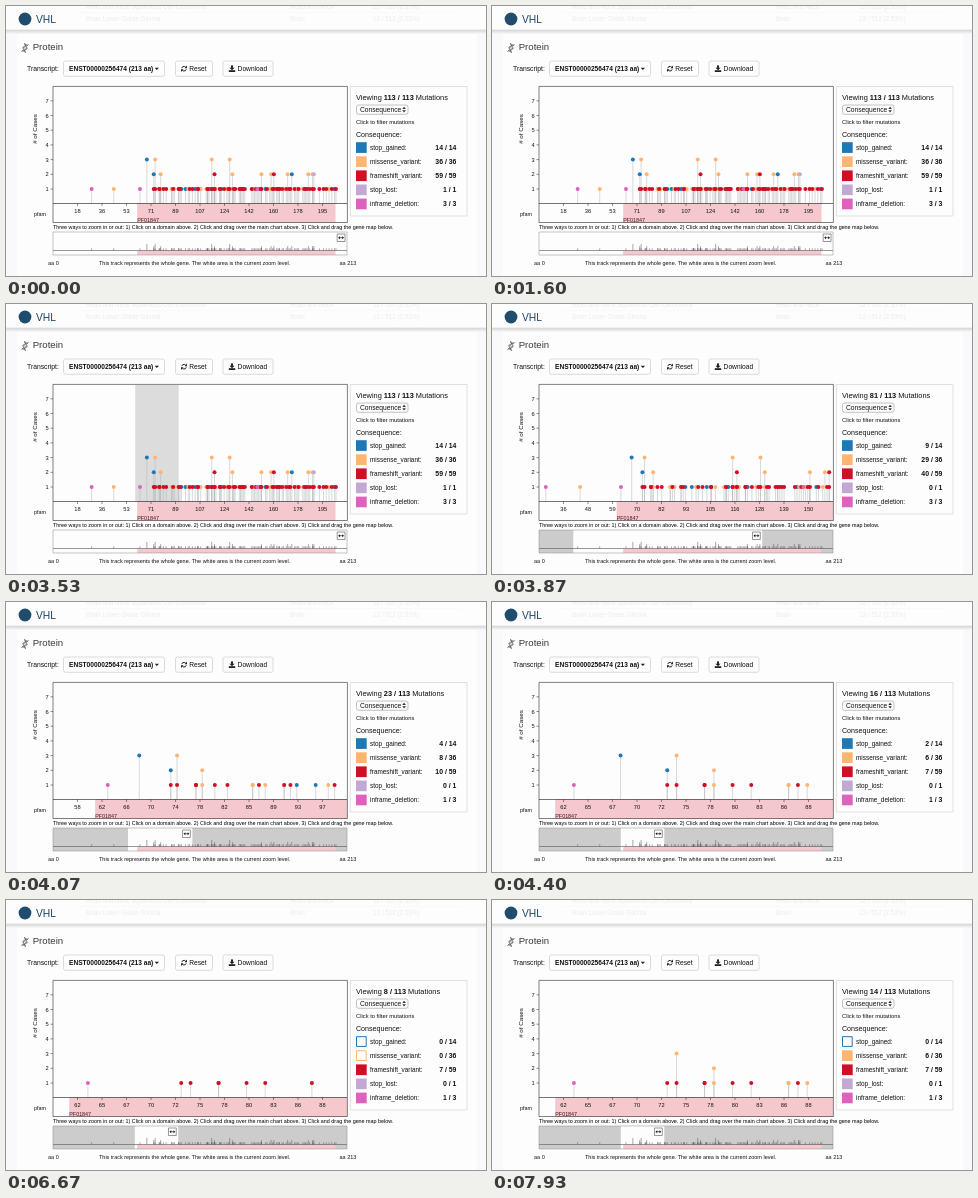
Recreate the animation shown at these times as an HTML page with a canvas. Size 480 px wide and 270 px high, loop 8000 ms.

```html
<!DOCTYPE html>
<html lang="en">
<head>
<meta charset="utf-8">
<title>Protein mutations</title>
<style>
html, body { margin: 0; width: 100%; height: 100%; overflow: hidden; background: #fff; }
canvas { display: block; width: 480px; height: 270px; }
</style>
</head>
<body>
<canvas id="stage"></canvas>
<script>
const canvas = document.getElementById('stage');
const ctx = canvas.getContext('2d');
const dpr = Math.max(1, window.devicePixelRatio || 1);
canvas.width = 480 * dpr;
canvas.height = 270 * dpr;

const LOOP = 8000;
const LENGTH = 213;
const LEFT = 47, WIDTH = 294, RIGHT = LEFT + WIDTH;
const AXIS = 197.5, STEP = 14.7, BASE = 197.7;
const DOMAIN = [61, 204.7];
const ZOOM = [59.26, 90.76];
const PINK = '#f4c8cc';
const PAPER = '#fefdfe';

// Positions per consequence, grouped by number of cases.
const types = [
  { name: 'stop_gained', color: '#1f77b4', cases: {
    1: [93, 96, 103, 113, 122, 145, 154, 164, 177, 183, 204],
    2: [73, 173],
    3: [68] } },
  { name: 'missense_variant', color: '#fdb572', cases: {
    1: [44, 78, 86, 86, 88, 91, 98, 105, 107, 111, 112, 116, 118, 121, 126, 130,
        131, 136, 146, 149, 151, 157, 167, 176, 181, 200],
    2: [78, 130, 151, 158, 170, 185, 188],
    3: [74, 115, 128] } },
  { name: 'frameshift_variant', color: '#ce0f24', cases: {
    1: [73, 74, 77, 77, 80, 82, 87, 91, 92, 99, 101, 105, 105, 112, 112, 115, 115,
        117, 117, 121, 121, 124, 127, 128, 131, 132, 135, 136, 137, 138, 139, 144,
        147, 150, 151, 155, 159, 160, 162, 163, 164, 166, 169, 171, 172, 175, 178,
        182, 184, 186, 188, 189, 193, 196, 198, 202, 205],
    2: [117, 160] } },
  { name: 'stop_lost', color: '#c3a8d3', cases: { 2: [189] } },
  { name: 'inframe_deletion', color: '#dd62bd', cases: { 1: [28, 63, 148] } }
];
const points = types.flatMap((type, i) =>
  Object.entries(type.cases).flatMap(([n, list]) => list.map(pos => ({ type: i, n: +n, pos }))));

const clamp = (v, a = 0, b = 1) => Math.min(b, Math.max(a, v));
const span = (t, from, to) => clamp((t - from) / (to - from));
const ease = p => p < 0.5 ? 2 * p * p : 1 - 2 * (1 - p) * (1 - p);
const mapX = pos => LEFT + pos / LENGTH * WIDTH;

function rect(x, y, w, h, color) {
  ctx.fillStyle = color;
  ctx.fillRect(x, y, w, h);
}

function line(x1, y1, x2, y2, color, width = 0.6) {
  ctx.strokeStyle = color;
  ctx.lineWidth = width;
  ctx.beginPath();
  ctx.moveTo(x1, y1);
  ctx.lineTo(x2, y2);
  ctx.stroke();
}

function box(x, y, w, h, color, radius = 0, width = 0.7) {
  ctx.strokeStyle = color;
  ctx.lineWidth = width;
  ctx.beginPath();
  ctx.roundRect(x, y, w, h, radius);
  ctx.stroke();
}

function shape(color, ...pts) {
  ctx.fillStyle = color;
  ctx.beginPath();
  pts.forEach(([x, y]) => ctx.lineTo(x, y));
  ctx.fill();
}

function text(str, x, y, size, { color = '#111', bold = false, align = 'left' } = {}) {
  ctx.font = `${bold ? 'bold ' : ''}${size}px "Liberation Sans", Arial, sans-serif`;
  ctx.fillStyle = color;
  ctx.textAlign = align;
  ctx.fillText(str, x, y);
  return x + ctx.measureText(str).width;
}

function drawHeader() {
  rect(0, 24, 480, 246, '#f9f8fa');
  rect(11, 28, 460, 242, PAPER);
  rect(0, 0, 480, 24, PAPER);
  const ghost = { color: '#ececec' };
  [['Head and Neck Squamous Cell Carcinoma', 'Head and Neck', '12 / 510 (2.35%)', 3.2],
   ['Brain Lower Grade Glioma', 'Brain', '13 / 512 (2.53%)', 15]].forEach(([a, b, c, y]) => {
    text(a, 80, y, 6.3, ghost);
    text(b, 284, y, 6.3, ghost);
    text(c, 367, y, 6.3, ghost);
  });
  line(70, 6.5, 455, 6.5, '#f4f4f4', 0.5);
  const shade = ctx.createLinearGradient(0, 23.5, 0, 28);
  shade.addColorStop(0, '#d2d2d2');
  shade.addColorStop(1, '#f9f8fa');
  rect(0, 23.7, 480, 4.3, shade);
  ctx.fillStyle = '#204c6e';
  ctx.beginPath();
  ctx.arc(19, 13, 6.4, 0, 7);
  ctx.fill();
  text('VHL', 30, 16.8, 10.3, { color: '#1f4667' });
}

function drawHelix() {
  ctx.save();
  ctx.translate(19, 42);
  ctx.rotate(0.35);
  for (const side of [-1, 1]) {
    ctx.strokeStyle = '#444';
    ctx.lineWidth = 0.8;
    ctx.beginPath();
    for (let i = 0; i <= 20; i++) {
      ctx.lineTo(side * 2 * Math.cos(i / 20 * Math.PI * 2), -4.5 + i * 0.45);
    }
    ctx.stroke();
  }
  [-3.6, 0, 3.6].forEach(y => line(-1.6, y, 1.6, y, '#444', 0.5));
  ctx.restore();
}

function drawToolbar() {
  drawHelix();
  text('Protein', 26.7, 44.4, 9.6, { color: '#3a3a3a' });
  text('Transcript:', 21, 65, 6.8);
  [[57.5, 101], [169.5, 37], [217, 50]].forEach(([x, w]) => box(x, 55, w, 15.3, '#ccc', 2));
  text('ENST00000256474 (213 aa)', 63, 65, 6.6, { bold: true });
  shape('#222', [148.7, 61.7], [153, 61.7], [150.85, 64]);
  text('Reset', 183.2, 65, 6.7);
  text('Download', 231.6, 65, 6.65);

  ctx.strokeStyle = '#222';
  ctx.lineWidth = 1;
  for (const a of [0.25, Math.PI + 0.25]) {
    ctx.beginPath();
    ctx.arc(178, 62.7, 2.3, a, a + 2.3);
    ctx.stroke();
  }
  shape('#222', [181, 59.5], [181, 62.2], [178.5, 62.2]);
  shape('#222', [175, 65.9], [175, 63.2], [177.5, 63.2]);

  rect(225, 59.4, 2, 2.5, '#222');
  shape('#222', [223.4, 61.7], [228.6, 61.7], [226, 64.3]);
  rect(222.8, 64.2, 6.4, 1.8, '#222');
}

function drawChart(min, max, brush, active) {
  const x = pos => LEFT + (pos - min) / (max - min) * WIDTH;
  const dx1 = clamp(x(DOMAIN[0]), LEFT, RIGHT);
  const dx2 = clamp(x(DOMAIN[1]), LEFT, RIGHT);
  rect(dx1, AXIS, dx2 - dx1, 19, PINK);
  if (brush > 0) rect(129.2, 81, brush, 116.5, '#dcdcdc');

  const shown = points.filter(p => active[p.type] && p.pos >= min && p.pos <= max);
  for (const p of shown) line(x(p.pos), AXIS, x(p.pos), BASE - p.n * STEP, '#b5b5b5', 0.5);
  for (const p of shown) {
    ctx.fillStyle = types[p.type].color;
    ctx.beginPath();
    ctx.arc(x(p.pos), BASE - p.n * STEP, 2, 0, 7);
    ctx.fill();
  }

  box(LEFT, 80.4, WIDTH + 0.4, 136.1, '#000', 0, 0.5);
  line(LEFT, AXIS, RIGHT, AXIS, '#000', 0.55);
  for (let n = 1; n <= 7; n++) {
    const y = BASE - n * STEP;
    line(44.5, y, LEFT, y, '#222', 0.5);
    text(n, 42.7, y + 2, 5.7, { align: 'right' });
  }
  for (let i = 1; i < 12; i++) {
    const tx = LEFT + i * WIDTH / 12;
    line(tx, AXIS, tx, AXIS + 2.5, '#222', 0.5);
    text(Math.round(min + (max - min) * i / 12), tx, 207.2, 5.7, { align: 'center' });
  }
  text('PF01847', dx1, 216.4, 5.4, { color: '#4a1218' });
  text('pfam', 28, 210, 5.4);
  ctx.save();
  ctx.translate(31.3, 123);
  ctx.rotate(-Math.PI / 2);
  text('# of Cases', 0, 0, 6.2, { align: 'center' });
  ctx.restore();
  text('Three ways to zoom in or out: 1) Click on a domain above. 2) Click and drag over the main chart above. 3) Click and drag the gene map below.',
    LEFT, 223.2, 5.4, { color: '#000' });
}

function drawMap(min, max) {
  const a = mapX(min), b = mapX(max), top = 226, height = 23;
  rect(LEFT, top, a - LEFT, height, '#cccccd');
  rect(b, top, RIGHT - b, height, '#cccccd');
  rect(mapX(DOMAIN[0]), 244.7, mapX(DOMAIN[1]) - mapX(DOMAIN[0]), 4.3, PINK);
  for (const p of points) line(mapX(p.pos), 244.5, mapX(p.pos), 244.5 - p.n * 2.2, '#555', 0.5);
  line(LEFT, 244.5, RIGHT, 244.5, '#555', 0.6);
  box(LEFT, top, WIDTH, height, '#888', 0, 0.5);

  const hx = b - 9.8, mid = 231.7;
  rect(hx, 228, 7.8, 7.5, '#fff');
  box(hx, 228, 7.8, 7.5, '#555', 0, 0.6);
  line(hx + 2, mid, hx + 5.8, mid, '#222', 0.7);
  shape('#222', [hx + 0.9, mid], [hx + 2.8, mid - 1.5], [hx + 2.8, mid + 1.5]);
  shape('#222', [hx + 6.9, mid], [hx + 5, mid - 1.5], [hx + 5, mid + 1.5]);

  text('aa 0', 42, 258.5, 5.5);
  text('This track represents the whole gene. The white area is the current zoom level.', 93, 258.5, 5.47);
  text('aa 213', 333.5, 258.5, 5.5);
}

function drawPanel(min, max, active) {
  const within = points.filter(p => active[p.type] && p.pos >= min && p.pos <= max);
  box(344.3, 80.5, 116.7, 129.5, '#d5d5d5');
  let x = text('Viewing ', 350, 94.4, 7.4);
  x = text(`${within.length} / ${points.length}`, x, 94.4, 7.4, { bold: true });
  text(' Mutations', x, 94.4, 7.4);

  box(350.5, 99, 51.5, 9.3, '#aaa', 2);
  text('Consequence', 354, 106, 6.7);
  shape('#333', [396.3, 103], [399.9, 103], [398.1, 100.7]);
  shape('#333', [396.3, 104.3], [399.9, 104.3], [398.1, 106.6]);
  text('Click to filter mutations', 350, 118, 5.8);
  text('Consequence:', 350, 131, 7.1);

  types.forEach((type, i) => {
    const y = 136.2 + i * 14.1;
    if (active[i]) rect(350, y, 10.7, 10.7, type.color);
    else box(350.5, y + 0.5, 9.7, 9.7, type.color, 0, 1);
    text(type.name + ':', 364, y + 7.7, 6.4);
    const count = within.filter(p => p.type === i).length;
    const total = points.filter(p => p.type === i).length;
    text(`${count} / ${total}`, 450.4, y + 7.7, 6.9, { bold: true, align: 'right' });
  });
}

function draw(t) {
  ctx.setTransform(dpr, 0, 0, dpr, 0, 0);
  const zoom = ease(span(t, 3600, 4192));
  const min = ZOOM[0] * zoom;
  const max = LENGTH + (ZOOM[1] - LENGTH) * zoom;
  const brush = t < 3600 ? 43.5 * span(t, 2960, 3480) : 0;
  const active = [t < 5900, t < 6600 || t >= 7730, true, true, true];

  drawHeader();
  drawToolbar();
  drawChart(min, max, brush, active);
  drawMap(min, max);
  drawPanel(min, max, active);
}

const start = performance.now();
function tick() {
  draw((performance.now() - start) % LOOP);
  requestAnimationFrame(tick);
}
tick();
</script>
</body>
</html>
```
